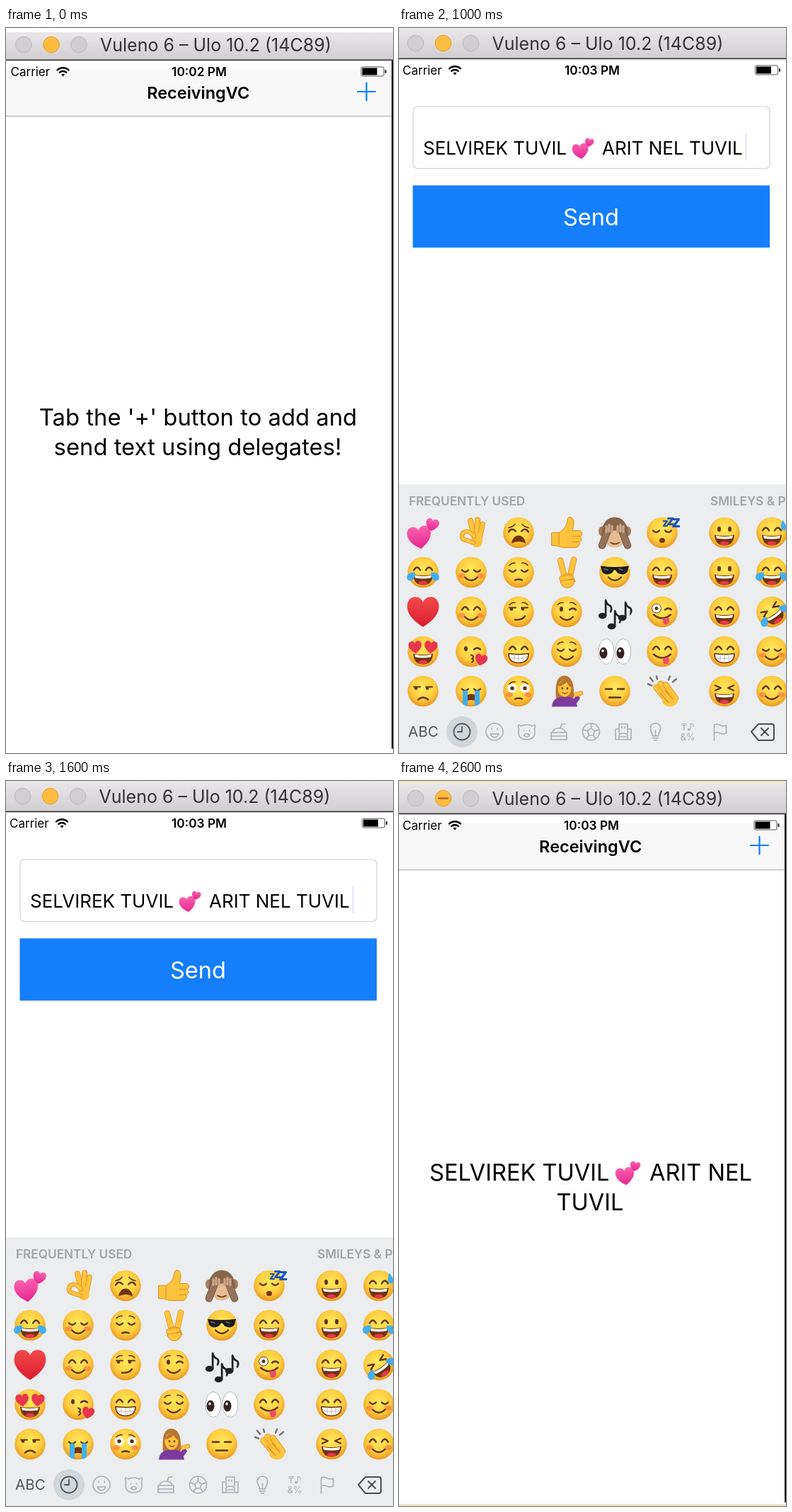
Animation, 547 px wide and 1025 px high, one loop 3000 ms. Source, as an HTML page:

```html
<!DOCTYPE html>
<html lang="en">
<head>
<meta charset="utf-8">
<title>Delegate demo</title>
<style>
  html, body { margin: 0; width: 100%; height: 100%; overflow: hidden; background: #fff; }
  svg { display: block; width: 100%; height: 100%; font-family: Inter, sans-serif; }
  path { stroke-linecap: round; stroke-linejoin: round; }
</style>
</head>
<body>
<svg id="stage" viewBox="0 0 547 1025"></svg>
<script>
const LOOP = 3000, HOLD = 1000;
const BROWN = '#5f3510', MOUTH = '#70340f', RED = '#e8364d', SKIN = '#fdc33c', SHADE = '#d98a1b', BLUE = '#41aef0';

// Drawing helpers
const rect = (x, y, w, h, fill, more = '') =>
  `<rect x="${x}" y="${y}" width="${w}" height="${h}" fill="${fill}" ${more}/>`;
const oval = (x, y, rx, ry, fill, more = '') =>
  `<ellipse cx="${x}" cy="${y}" rx="${rx}" ry="${ry}" fill="${fill}" ${more}/>`;
const shape = (d, fill, more = '') => `<path d="${d}" fill="${fill}" ${more}/>`;
const line = (d, color = BROWN, width = 2.4) =>
  shape(d, 'none', `stroke="${color}" stroke-width="${width}"`);
const text = (s, x, y, size, more = '') =>
  `<text x="${x}" y="${y}" font-size="${size}" ${more}>${s}</text>`;
const at = (x, y, body, scale = 1, turn = 0) =>
  `<g transform="translate(${x} ${y}) rotate(${turn}) scale(${scale})">${body}</g>`;
const both = body => body + `<g transform="scale(-1 1)">${body}</g>`;
const MIDDLE = 'text-anchor="middle"', BOLD = 'font-weight="600"';

// Face parts, centred on 0,0 with a radius of about 22
const eyes = {
  dots: both(oval(7.5, -5, 2.5, 3.8, BROWN)),
  happy: both(line('M4 -3Q8.5 -11 13 -3')),
  closed: both(line('M4 -3Q8.5 2 13 -3')),
  squeezed: both(line('M13 -8L5 -4.5L13 -1')),
  weary: both(line('M4 -2Q10 -8 14 -1') + line('M5 -12Q8 -8 14 -7', BROWN, 1.6)),
  flat: both(line('M4 -3H13')),
  side: both(line('M4 -6H13', BROWN, 2)) + oval(-10, -4, 2.3, 2.3, BROWN) + oval(6, -4, 2.3, 2.3, BROWN),
  wink: oval(-7.5, -4, 2.5, 3.6, BROWN) + line('M4 -3Q8.5 -7 13 -3'),
  wide: both(oval(9, -4, 6.5, 6.5, '#fff') + oval(9, -4, 2.8, 2.8, BROWN))
};
const mouths = {
  smile: line('M-9 7Q0 16 9 7'),
  small: line('M-5 11Q0 9 5 11'),
  smirk: line('M-5 11Q5 12 9 6'),
  frown: line('M-7 12Q0 6 7 12'),
  flat: line('M-8 9H8'),
  round: oval(0, 11, 4, 3.5, MOUTH),
  wail: shape('M-10 15Q-8 4 0 4Q8 4 10 15Q0 10 -10 15Z', MOUTH),
  pout: line('M0 5Q6 7 1 10Q6 12 1 15', BROWN, 2),
  open: shape('M-14 3Q0 6 14 3Q13 18 0 18Q-13 18 -14 3Z', MOUTH) +
        shape('M-12 4Q0 7 12 4L11 8Q0 10 -11 8Z', '#fff') + oval(0, 15, 6.5, 2.8, RED),
  teeth: shape('M-14 3Q0 5 14 3Q14 16 0 16Q-14 16 -14 3Z', '#fff', `stroke="${BROWN}" stroke-width="1.6"`) +
         line('M-13 9Q0 11 13 9M-6 4V15M0 5V16M6 4V15', '#b9aa99', .8),
  tongue: line('M-12 4Q0 14 12 4') + shape('M0 9Q6 9 9 7L10 14Q7 20 2 17Z', '#ee4d68')
};
const face = (eye, mouth, extra = '') =>
  oval(0, 0, 21.8, 21.8, 'url(#face)') + (eyes[eye] ?? '') + (mouths[mouth] ?? '') + extra;
const cheeks = both(oval(13, 5, 5, 3.5, '#f2683a', 'opacity=".55"'));
const brows = both(line('M5 -13Q9 -14 13 -10', BROWN, 1.6));
const tears = both(shape('M11 0Q23 0 23 7Q22 14 15 11Q11 8 11 0Z', BLUE));

// Other emoji parts
const heart = fill =>
  shape('M0 19C-8 14 -20 5 -20 -7C-20 -15 -15 -19 -10 -19C-5 -19 -1 -16 0 -12C1 -16 5 -19 10 -19C15 -19 20 -15 20 -7C20 5 8 14 0 19Z', fill);
const finger = (d, width = 7, fill = SKIN, edge = SHADE) => line(d, edge, width + 1.4) + line(d, fill, width);
const snore = (x, y, size) => text('z', x, y, size, 'fill="#1d54b8" font-weight="800"');
const note = (x, y) =>
  at(x, y, oval(-3, 10, 5, 3.8, '#222') + line('M1 10V-9Q2 -4 7 -2Q9 1 7 5', '#222', 2.4), 1.15);
const eyeball = x => oval(x, 0, 11, 18, '#fff', 'stroke="#b5b8bb"') +
  oval(x - 4, 2, 5.5, 8, '#34241d') + oval(x - 5, -1, 1.7, 2, '#fff');

const emoji = {
  hearts: at(-5, 7, heart('url(#pink)'), .84, -8) + at(13, -11, heart('url(#pink)'), .46, 12),
  ok: finger('M4 4L-1 -17', 6.5) + finger('M8 5L9 -18', 6.5) + finger('M12 8L16 -12', 6) +
      oval(8, 11, 8, 10, SKIN) + finger('M4 5Q-5 -6 -12 1Q-16 9 -6 11L3 14', 5),
  weary: face('weary', 'wail'),
  thumb: shape('M-21 0H-11C-3 -5 0 -10 1 -18C2 -25 10 -22 10 -15C10 -10 9 -6 8 -3H17C23 -3 23 5 18 5C23 7 21 13 17 13C20 16 17 21 12 21H-4C-10 21 -12 18 -21 18Z', SKIN, `stroke="${SHADE}"`) +
      line('M8 5H18M8 13H17M-11 0V18', SHADE, 1),
  monkey: both(oval(18, -2, 5, 7, '#a37c5c')) + oval(0, -1, 18.5, 21, '#86674a') + oval(0, 9, 14, 12, '#e6bd92') +
      line('M-6 14Q0 18 6 14', '#70462c', 1.8) +
      both(finger('M18 18L10 -3', 9, '#94735a', '#60483a') + line('M4 -1V-9M8 -2V-11M12 -1V-9', '#caa488', 3.4)),
  sleepy: face('closed', 'round') + snore(0, -9, 15) + snore(6, -11, 20) + snore(13, -8, 23),
  grin: face('dots', 'open'),
  sweat: face('happy', 'open', shape('M15 -18Q24 -7 18 -3Q9 -3 15 -18Z', BLUE)),
  joy: face('happy', 'open', tears),
  relaxed: face('closed', 'smile', cheeks),
  blush: face('happy', 'smile', cheeks),
  smiling: face('happy', 'open'),
  beaming: face('happy', 'teeth'),
  pensive: face('closed', 'small', brows),
  victory: finger('M-3 6L-9 -17', 7) + finger('M5 5L10 -18', 7) + oval(1, 12, 10, 10, SKIN, `stroke="${SHADE}"`) +
      finger('M-7 9L5 7', 6) + line('M4 11Q10 8 12 13', SHADE, 1.4),
  cool: face('', 'smile', shape('M-20 -9Q0 -6 20 -9L18 -1Q13 6 4 1L1 -3H-1L-4 1Q-13 6 -18 -1Z', '#1c1b1d') +
      line('M-15 -5L-10 -3M6 -5L11 -3', '#68717a', 1.4)),
  heart: at(0, 0, heart('url(#red)'), 1.12),
  smirk: face('side', 'smirk', brows),
  wink: face('wink', 'smile', brows),
  notes: note(-14, -6) + note(-1, 9) + note(14, -3),
  tongue: face('wink', 'tongue', oval(-8, -5, 6.5, 6.5, '#fff', `stroke="${BROWN}"`) + oval(-8, -5, 2.5, 2.5, BROWN)),
  rofl: at(0, 0, face('squeezed', 'open', tears), 1, -35),
  loving: face('', 'open', both(at(11, -6, heart(RED), .46, 6))),
  kiss: face('wink', 'pout', at(14, 12, heart(RED), .43, 12)),
  relieved: face('closed', 'smile', brows),
  eyes: eyeball(-12) + eyeball(12),
  yum: face('happy', 'tongue'),
  unamused: face('side', 'frown'),
  sob: face('closed', 'wail', both(shape('M5 -1H12V18Q9 21 5 21Z', BLUE))),
  flushed: face('wide', 'small', cheeks + brows),
  woman: shape('M-15 10Q-18 -22 -3 -22Q12 -21 10 10Z', '#b9752f') + shape('M-21 22Q-20 9 -6 8H3Q13 9 15 22Z', '#7c3b9d') +
      oval(-3, -4, 9.5, 12, SKIN) + shape('M-13 -7Q-7 -17 3 -18Q8 -13 8 -5Q2 -7 0 -13Q-5 -7 -13 -7Z', '#b9752f') +
      oval(-6, -4, 1.2, 1.7, BROWN) + oval(1, -4, 1.2, 1.7, BROWN) + line('M-6 2Q-2 5 1 2', '#b44734', 1.5) +
      line('M9 18L15 10', '#7c3b9d', 7) + finger('M13 5L20 3', 5),
  blank: face('flat', 'flat'),
  clap: at(2, 4, finger('M-10 -9L8 12', 8) + finger('M-4 -14L13 8', 8) + finger('M3 -13L17 6', 7) + oval(9, 9, 11, 9, SKIN) +
      line('M-5 -1L7 12M2 -5L13 7', SHADE, 1.2)) + line('M-20 -10L-15 -8M-17 -19L-13 -14M-8 -21L-7 -17M11 -21L9 -16M20 -17L15 -13', '#757779', 2.6),
  laughing: face('squeezed', 'open')
};

const columns = [34, 102, 169, 237, 305, 372, 460, 527];
const rows = [
  'hearts ok weary thumb monkey sleepy grin sweat',
  'joy relaxed pensive victory cool smiling grin joy',
  'heart blush smirk wink notes tongue smiling rofl',
  'loving kiss beaming relieved eyes yum beaming relaxed',
  'unamused sob flushed woman blank clap laughing blush'
];

// Window title and phone status bar
function chrome(dx, dy, top, time, timeX, minimise = false) {
  const light = (x, fill, edge) => oval(x + dx, 21.5 + dy, 11.3, 11.3, fill, `stroke="${edge}"`);
  const batteryX = dy ? 502 : 503.5, base = 66 + dy;
  return rect(0, top, 547, 43 + dy - top, 'url(#bar)') + rect(0, 42.5 + dy, 547, 1.7, '#39363a') +
    light(23.5, '#d0ced0', '#b9b7b9') + light(62.5, '#fdbc40', '#dfa032') + light(101.5, '#d0ced0', '#b9b7b9') +
    (minimise ? line(`M56 ${21.5 + dy}h13`, '#985712', 2) : '') +
    text('Vuleno 6 – Ulo 10.2 (14C89)', 131.5 + dx, 31 + dy, 25, 'fill="#343234"') +
    text('Carrier', 5 + dx, base, 17) + text(time, timeX, base, 17.3, `${MIDDLE} ${BOLD}`) +
    at(79 + dx, base - 1.5, line('M-8 -7A11.5 11.5 0 0 1 8 -7M-4.8 -3.6A7 7 0 0 1 4.8 -3.6', '#000', 2.3) + shape('M-2.5 -1L0 2L2.5 -1Q0 -2.5 -2.5 -1Z', '#000')) +
    rect(batteryX, base - 13, 32, 13, '#fff', 'rx="2" stroke="#555"') +
    rect(batteryX + 1.5, base - 11.5, 21, 10, '#000') + rect(batteryX + 33.5, base - 9, 2, 5, '#222', 'rx="1"');
}

function home(dx, dy, top, time, timeX, body, minimise) {
  const y = 43 + dy;
  return rect(0, y, 547, 79, '#f8f8f9') + rect(0, y, 547, 14, '#fff') + rect(0, y + 79, 547, 1.2, '#b5b5b7') +
    chrome(dx, dy, top, time, timeX, minimise) +
    text('ReceivingVC', 270.7 + dx * .7, 98 + dy, 23.5, `${MIDDLE} ${BOLD}`) +
    line(`M497 ${88 + dy}h25m-12.5 -12.5v25`, '#087dff', 2.2) +
    rect(545, y + 1, 2, 973, '#111') + body;
}

// Category icons at the foot of the keyboard
function categories() {
  const icons = [
    'M12 0A12 12 0 1 1 -12 0A12 12 0 1 1 12 0M-6 3Q0 13 6 3ZM-4 -5v2M4 -5v2',
    'M-8 -8Q-14 -13 -11 -4Q-14 11 0 11Q14 11 11 -4Q14 -13 8 -8Q0 -12 -8 -8M-4 -2v1M4 -2v1M-4 5Q0 0 4 5Q0 9 -4 5',
    'M-11 1H11V11H-11ZM-11 6H11M-9 1Q-8 -5 0 -5Q8 -5 9 1M2 -5L4 -11H9',
    'M12 0A12 12 0 1 1 -12 0A12 12 0 1 1 12 0M0 -5L5 -1L3 5H-3L-5 -1ZM0 -5V-11M5 -1L11 -3M3 5L7 10M-3 5L-7 10M-5 -1L-11 -3',
    'M-11 11V-4H-6V-11H6V-4H11V11ZM-6 -4V2M6 -4V2M-2 -7v2M2 -7v2M-6 11V6Q-6 2 0 2Q6 2 6 6V11M-4 7H4',
    'M-4 6Q-4 3 -6 0Q-10 -11 0 -12Q10 -11 6 0Q4 3 4 6ZM-4 9H4M-2 12H2M0 5V-2',
    '',
    'M-8 12V-10Q-3 -12 1 -9Q4 -7 9 -9V2Q4 4 0 2Q-4 0 -8 2'
  ];
  return text('ABC', 13, 1002, 20.6, 'fill="#53575c"') + oval(89, 995, 22, 22, '#d1d6db') +
    oval(89, 995, 11.5, 11.5, 'none', 'stroke="#4d535b" stroke-width="1.8"') + line('M89 988V995H83', '#4d535b', 1.8) +
    icons.map((d, i) => at(135 + i * 45.5, 995, line(d, '#a9afb6', 1.6))).join('') +
    text('₸♪', 408, 993, 13, `${MIDDLE} fill="#a9afb6"`) + text('&amp;%', 408, 1007, 13, `${MIDDLE} fill="#a9afb6"`) +
    line('M498 995L508 984H527Q530 984 530 987V1004Q530 1007 527 1007H508ZM512 990L522 1000M522 990L512 1000', '#4c4f53', 2);
}

function compose() {
  const heading = `fill="#a1a5a9" ${BOLD}`;
  return chrome(0, 0, 0, '10:03 PM', 273) +
    rect(20, 111, 504, 87.5, '#fff', 'rx="6" stroke="#d0d1d3" stroke-width="1.2"') +
    text('SELVIREK TUVIL', 34, 179, 26) + at(260, 169.5, emoji.hearts, .68) + text('ARIT NEL TUVIL', 287, 179, 26) +
    rect(489.5, 149, 2, 38, '#dfe3f8') +
    rect(19.5, 222.5, 504.5, 88, '#147efb') + text('Send', 271.5, 279, 32.6, `${MIDDLE} fill="#fff"`) +
    rect(0, 645, 547, 380, '#ebedef') +
    text('FREQUENTLY USED', 14, 674.5, 17.2, heading) + text('SMILEYS &amp; PEOPLE', 440, 674.5, 17.2, heading) +
    rows.map((row, r) => row.split(' ').map((name, c) => at(columns[c], 713.5 + r * 56, emoji[name])).join('')).join('') +
    categories();
}

const stops = (...list) => list.map(([offset, color]) => `<stop offset="${offset}" stop-color="${color}"/>`).join('');
const defs = `<defs>
  <radialGradient id="face" cy=".4" r=".62">${stops([0, '#ffe85c'], [.6, '#fdce40'], [1, '#e8921f'])}</radialGradient>
  <linearGradient id="bar" x2="0" y2="1">${stops([0, '#e9e7e9'], [1, '#d0ced0'])}</linearGradient>
  <linearGradient id="pink" x2="0" y2="1">${stops([0, '#fa62ae'], [1, '#e52591'])}</linearGradient>
  <linearGradient id="red" x2="0" y2="1">${stops([0, '#f34a4b'], [1, '#d91d2e'])}</linearGradient>
</defs>`;

const prompt = text("Tab the '+' button to add and", 271.5, 562.3, 32.8, MIDDLE) +
  text('send text using delegates!', 271, 604, 32.8, MIDDLE);
const received = text('SELVIREK TUVIL', 43, 565.3, 32.6) + at(323.5, 553.5, emoji.hearts, .78) +
  text('ARIT NEL', 354, 565.3, 32.6) + text('TUVIL', 270, 607, 32.6, MIDDLE) +
  rect(0, 0, 547, 3, '#f1e6c6') + rect(0, 1022, 547, 3, '#f1e6c6');

const stage = document.getElementById('stage');
stage.innerHTML = defs + [
  home(1.5, 2, 6, '10:02 PM', 273, prompt),
  compose(),
  home(0, 3, 3, '10:03 PM', 272, received, true)
].map(body => `<g class="scene">${body}</g>`).join('');
const scenes = [...stage.querySelectorAll('.scene')];

function tick() {
  const current = Math.floor(performance.now() % LOOP / HOLD);
  scenes.forEach((scene, i) => scene.style.display = i === current ? '' : 'none');
  requestAnimationFrame(tick);
}
tick();
</script>
</body>
</html>
```
